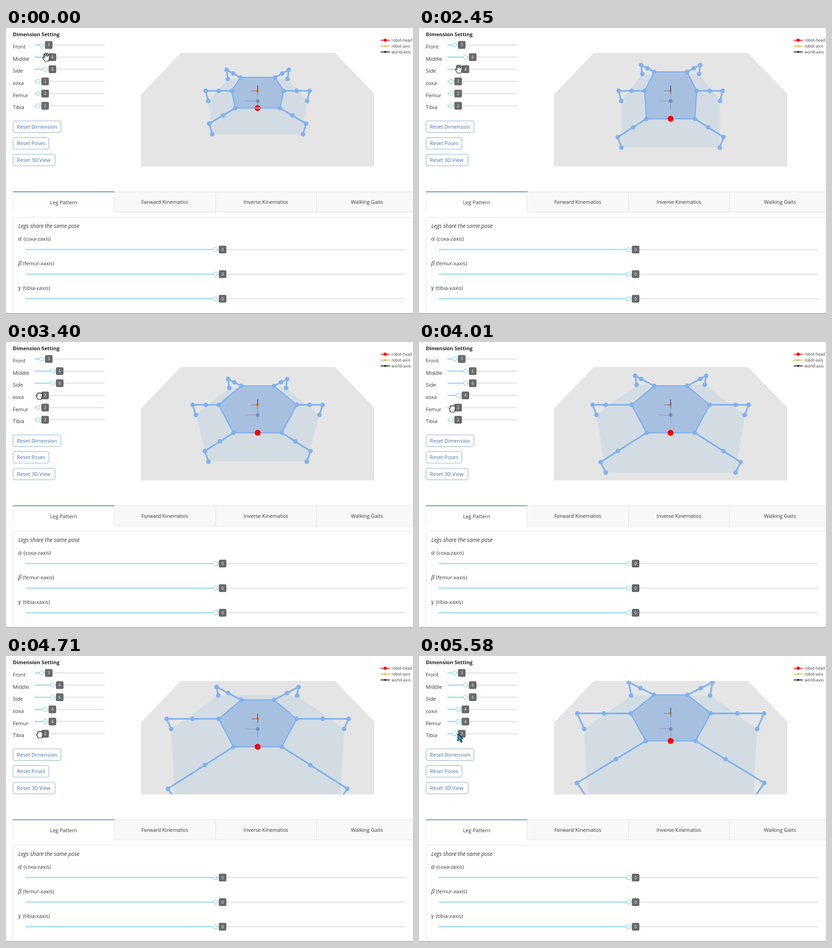
Write an HTML page that moves like this. It is 892 by 628 pixels and loops after 5.66 s.

```html
<!DOCTYPE html>
<html lang="en">
<head>
<meta charset="utf-8">
<title>Hexapod dimensions</title>
<style>
html, body { margin: 0; width: 100%; height: 100%; overflow: hidden; background: #fff; }
svg { display: block; width: 892px; height: 628px; }
text { font: 11.2px "Open Sans", "Noto Sans", sans-serif; fill: #333; }
.title { font-weight: 700; fill: #222; }
.note { font-size: 12px; font-style: italic; }
.greek { font: italic 14px "Liberation Serif", "Noto Serif", serif; }
.legend { font: 8.2px "DejaVu Sans", sans-serif; fill: #444; }
.mid { text-anchor: middle; }
.badge { font-size: 8.6px; fill: #fff; text-anchor: middle; }
.btn { fill: #fff; stroke: #82a5cc; }
.btn + text { fill: #3f70b5; }
.rail { stroke: #e8e8e8; stroke-width: 3; stroke-linecap: round; }
.fill { stroke: #abe1f0; stroke-width: 3; stroke-linecap: round; }
.thumb { fill: #fff; stroke: #9bdcf2; stroke-width: 1.6; }
.thumb.on { stroke: #57c5f0; stroke-width: 2; }
.leg { fill: none; stroke: #80b2f0; stroke-width: 3.6; stroke-linejoin: round; }
.joint { fill: #80b2f0; }
.cursor { stroke: #111; stroke-width: 1.2; stroke-linejoin: round; }
</style>
</head>
<body>
<svg viewBox="0 0 892 628">
  <defs><clipPath id="view"><rect x="296" y="55" width="511" height="249"/></clipPath></defs>
  <g id="page"></g>
  <g id="scene" clip-path="url(#view)"></g>
  <g id="sliders"></g>
  <path id="cursor" class="cursor"/>
</svg>
<script>
const LOOP = 5660;
const $ = id => document.getElementById(id);
const page = $('page'), scene = $('scene'), sliders = $('sliders');

function add(parent, tag, attrs, text) {
  const el = document.createElementNS('http://www.w3.org/2000/svg', tag);
  for (const k in attrs) el.setAttribute(k, attrs[k]);
  if (text !== undefined) el.textContent = text;
  parent.appendChild(el);
  return el;
}
const set = (el, attrs) => { for (const k in attrs) el.setAttribute(k, attrs[k]); };
const label = (x, y, text, cls = '') => add(page, 'text', { x, y, class: cls }, text);
const line = (x1, y1, x2, y2, stroke, w = 1) =>
  add(page, 'line', { x1, y1, x2, y2, stroke, 'stroke-width': w });

function slider(x1, x2, y) {
  add(sliders, 'line', { x1: x1 + 1.5, x2: x2 - 1.5, y1: y, y2: y, class: 'rail' });
  const fill = add(sliders, 'line', { x1: x1 + 1.5, y1: y, y2: y, class: 'fill' });
  const thumb = add(sliders, 'circle', { cy: y, r: 4.4 });
  const box = add(sliders, 'rect', { y: y - 8.5, width: 16.6, height: 17, rx: 3, fill: '#696969' });
  const num = add(sliders, 'text', { y: y + 3, class: 'badge' });
  return (x, value, on) => {
    set(fill, { x2: x });
    set(thumb, { cx: x, class: on ? 'thumb on' : 'thumb' });
    set(box, { x: x + 7.4 });
    set(num, { x: x + 15.7 });
    num.textContent = value;
  };
}

// Page
label(15, 17.5, 'Dimension Setting', 'title');
const dims = ['Front', 'Middle', 'Side', 'coxa', 'Femur', 'Tibia'].map((name, i) => {
  label(15, 45 + i * 26.65, name);
  return slider(62, 216, 37.2 + i * 26.7);
});
[['Reset Dimension', 105], ['Reset Poses', 78.5], ['Reset 3D View', 92]].forEach(([name, width], i) => {
  const y = 204 + i * 36.6;
  add(page, 'rect', { x: 15.5, y, width, height: 25.4, rx: 3.5, class: 'btn' });
  label(24, y + 16.7, name);
});
[['robot-head', 'red', 3.5], ['robot-axis', '#e3ae2b', 2], ['world-axis', '#000', 2]].forEach(([name, color, r], i) => {
  const y = 26.8 + i * 12.9;
  line(821, y, 841, y, color, 1.7);
  add(page, 'circle', { cx: 831, cy: y, r, fill: color });
  label(845, y + 3, name, 'legend');
});
add(page, 'rect', { x: 237, y: 359.5, width: 660, height: 44.5, fill: '#f8f8f8', stroke: '#e2e2e2' });
line(459.5, 360, 459.5, 404, '#e2e2e2');
line(680.5, 360, 680.5, 404, '#e2e2e2');
line(15.5, 360, 15.5, 404, '#e6e6e6');
line(15, 359.7, 237.5, 359.7, '#4a8ac4', 1.8);
['Leg Pattern', 'Forward Kinematics', 'Inverse Kinematics', 'Walking Gaits'].forEach((name, i) =>
  label(126.3 + i * 221.6, i ? 385.5 : 386.5, name, 'mid'));
add(page, 'rect', { x: 15.5, y: 415.5, width: 887, height: 240, rx: 4, fill: '#fff', stroke: '#e2e2e2' });
label(27, 439, 'Legs share the same pose', 'note');
[['α', 'coxa-zaxis'], ['β', 'femur-xaxis'], ['γ', 'tibia-xaxis']].forEach(([greek, name], i) => {
  const y = 466.5 + i * 54;
  label(27, y, greek, 'greek');
  label(i ? 37 : 38.5, y, `(${name})`);
  slider(43, 875, 486.5 + i * 54)(459, 0, false);
});
line(0, 627.5, 892, 627.5, '#606060');

// Scene: x is sideways, y is towards the viewer, z is up
function project(x, y, z) {
  const s = 1 / (0.0739 - 0.002245 * y - 0.00185 * z);
  return [551.5 + s * x, 179.5 + s * (0.6725 * y - 0.741 * z - 1.43)];
}
const path = (pts, close = '') => 'M' + pts.map(p => p.map(n => n.toFixed(2)).join(' ')).join('L') + close;

add(scene, 'path', { d: 'M383 55H721L807 144V304H296V146Z', fill: '#e5e5e5' });
const support = add(scene, 'path', { fill: '#d4dce3' });
const body = add(scene, 'path', { class: 'leg', style: 'fill:rgba(111,157,219,.45);stroke-width:2.8' });
const axis = (stroke, w) => add(scene, 'path', { fill: 'none', stroke, 'stroke-width': w });
const worldX = axis('#a48fa8', 1), worldY = axis('#8494b4', 1), worldZ = axis('#7795e0', 1);
const worldDot = add(scene, 'circle', { r: 4, fill: '#748fb6' });
const robotDot = add(scene, 'circle', { r: 3.5, fill: '#dca13c' });
const robotX = axis('#a8546a', 1.1), robotY = axis('#665d58', 1.2), robotZ = axis('#26304a', 1.2);
const legs = Array.from({ length: 6 }, () => ({
  line: add(scene, 'path', { class: 'leg' }),
  joints: [0, 1, 2, 3].map(() => add(scene, 'circle', { class: 'joint', r: 5 }))
}));
const head = add(scene, 'circle', { r: 6.5, fill: 'red' });
const headLine = add(scene, 'path', { d: 'M545.5 175.8H557.5', stroke: '#d9a0b8', 'stroke-width': 2.4 });

function drawRobot([front, len, mid, coxa, femur, tibia]) {
  const d = Math.SQRT1_2;
  // Corner and direction of each leg, going round the body
  const mounts = [
    [-front, -len, -d, -d], [front, -len, d, -d], [mid, 0, 1, 0],
    [front, len, d, d], [-front, len, -d, d], [-mid, 0, -1, 0]
  ];
  const feet = [], corners = [];
  mounts.forEach(([x, y, dx, dy], i) => {
    const at = (r, z) => project(x + dx * r, y + dy * r, z);
    const pts = [at(0, tibia), at(coxa, tibia), at(coxa + femur, tibia), at(coxa + femur, 0)];
    corners.push(pts[0]);
    feet.push(pts[3]);
    set(legs[i].line, { d: path(pts) });
    pts.forEach(([cx, cy], j) => set(legs[i].joints[j], { cx, cy }));
  });
  set(support, { d: path(feet, 'Z') });
  set(body, { d: path(corners, 'Z') });

  const ray = (z, n, x, y, up) => ({ d: path([project(0, 0, z), project(x * n, y * n, z + up * n)]) });
  const dot = (el, y, z) => { const [cx, cy] = project(0, y, z); set(el, { cx, cy }); };
  set(worldX, ray(0, 2, -1, 0, 0));
  set(worldY, ray(0, 2, 0, 1, 0));
  set(worldZ, ray(0, 2, 0, 0, 1));
  set(robotX, ray(tibia, 1, -1, 0, 0));
  set(robotY, ray(tibia, 1, 0, 1, 0));
  set(robotZ, ray(tibia, 1, 0, 0, 1));
  dot(worldDot, 0, 0);
  dot(robotDot, 0, tibia);
  dot(head, len, tibia);
  set(headLine, { visibility: len === 4 ? 'visible' : 'hidden' });
}

// Motion
const start = [3, 4, 4, 2, 2, 2];
const steps = [ // time, slider, new value
  [1990, 1, 5], [2130, 1, 6], [2720, 2, 5], [2870, 2, 6], [3540, 3, 3], [3660, 3, 4],
  [4200, 4, 3], [4350, 4, 4], [5000, 5, 3]
];
const shapes = {
  hand: ['#fff', 'M-4 9C-6 5-9 2-8.5.5C-8-.8-6 0-4.5 2L-6.5-5C-7-7-4.8-7.5-4.2-5.5L-3-1.5L-3.6-7.5C-3.6-9.5-1.2-9.5-1-7.5L-.2-2L.8-7.8C1.2-9.5 3.4-9 3.2-7L2.6-1.2L5-5.6C6-7 8-6 7.2-4C5.5 1 6.5 4 4 9Z'],
  fist: ['#fff', 'M-3.5 8C-4 5-7 3-6.5.5C-6.3-1-5-1-4.5-.5L-4.8-4C-4.8-6-2.4-6.2-1.8-4.6C-1.8-7 1-7 1.2-5C1.6-6.8 4-6.5 4-4.4C5-5.6 6.8-4.6 6.6-3C6.4 2 5.5 4 4.5 8Z'],
  arrow: ['#1fa6e6', 'M0 0V15.5L3.8 12L7 18.8L9.8 17.5L6.7 11H11.7Z']
};
const moves = [ // time, x, y, cursor, slider held
  [0, 89, 64, 'hand'], [1850, 93, 65, 'arrow', 1], [1920, 94, 65, 'arrow', 1], [2150, 109, 65, 'arrow', 1],
  [2240, 104, 67, 'hand'], [2450, 88, 90, 'hand'],
  [2600, 93, 92, 'arrow', 2], [2950, 109, 92, 'arrow', 2],
  [3060, 104, 93, 'hand'], [3400, 73, 118, 'fist'],
  [3470, 77, 118, 'arrow', 3], [3730, 93, 118, 'arrow', 3],
  [3800, 89, 119, 'hand'], [4010, 73, 146, 'fist'],
  [4090, 77, 145, 'arrow', 4], [4420, 93, 145, 'arrow', 4],
  [4490, 89, 146, 'hand'], [4710, 74, 172, 'fist'],
  [4800, 77, 171, 'arrow', 5], [5250, 85, 171, 'arrow']
];

function drawCursor(t) {
  let i = moves.length - 1;
  while (moves[i][0] > t) i--;
  const [t0, x0, y0, kind, held] = moves[i];
  const next = moves[i + 1];
  let x = x0, y = y0;
  const glide = next && (next[3] === kind || kind === 'hand' && next[3] === 'fist');
  if (glide) {
    const u = (t - t0) / (next[0] - t0), k = u * u * (3 - 2 * u);
    x += (next[1] - x0) * k;
    y += (next[2] - y0) * k;
  }
  const [fill, d] = shapes[kind];
  set($('cursor'), { d, fill, transform: `translate(${x} ${y})` });
  return held;
}

function render(t) {
  const values = start.slice();
  for (const [at, i, v] of steps) if (t >= at) values[i] = v;
  const held = drawCursor(t);
  dims.forEach((draw, i) => draw(54 + 8 * values[i], values[i], i === held));
  drawRobot(values);
}

const t0 = performance.now();
function tick() {
  render((performance.now() - t0) % LOOP);
  requestAnimationFrame(tick);
}
tick();
</script>
</body>
</html>
```
